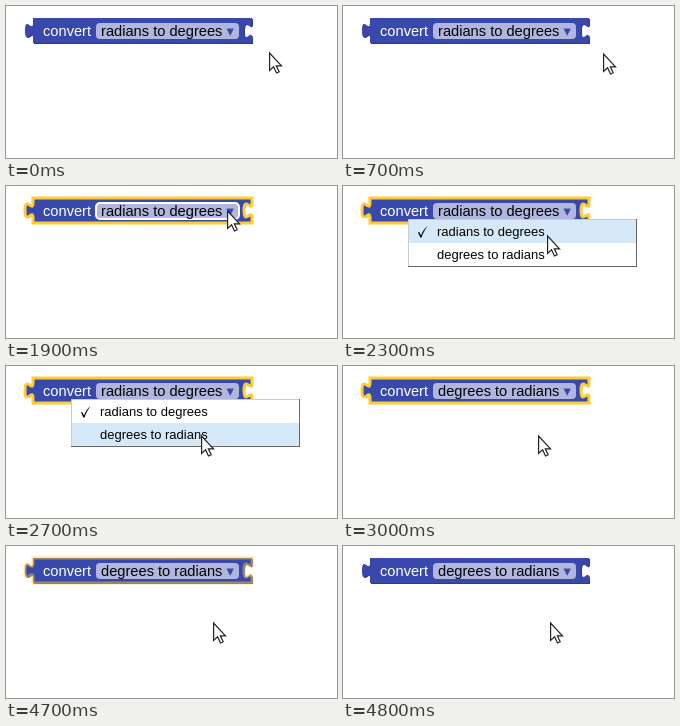
Recreate the animation shown at these times as an HTML page. Size 331 by 152 pixels, loop 5700 ms.

```html
<!DOCTYPE html>
<html lang="en">
<head>
<meta charset="utf-8">
<title>Angle conversion block</title>
<style>
  html, body { margin: 0; width: 100%; height: 100%; overflow: hidden; background: #fff; }
  svg { display: block; width: 100%; height: 100%; }
  text { font-family: "Liberation Sans", Arial, "DejaVu Sans", sans-serif; white-space: pre; }
  .block text { font-size: 11pt; }
  .menu text { font-size: 13px; }
</style>
</head>
<body>
<svg viewBox="0 0 331 152">
  <defs>
    <path id="shape" d="M27 12H246v5c0 10-8-8-8 7.500s8-2.500 8 7.500v5H27V32c0-10-8 8-8-7.500s8 2.500 8-7.500z"/>
  </defs>
  <g class="block">
    <use href="#shape" x="1" y="1" fill="#2e3a89"/>
    <use href="#shape" fill="#3949ab"/>
    <use id="selection" href="#shape" fill="none" stroke="#fc3" stroke-width="3"/>
    <text x="37" y="30" fill="#fff">convert</text>
    <rect id="field" x="90" y="17" width="143" height="16" rx="4" fill="#fff" fill-opacity=".6" stroke-width="2"/>
    <text x="95" y="30"><tspan id="value"></tspan><tspan fill="#3949ab"> ▾</tspan></text>
  </g>
  <g class="menu" id="menu">
    <rect x="65.5" y="33.5" width="228" height="47" fill="#fff" stroke="#666"/>
    <path d="M65.5 80V33.500H293" fill="none" stroke="#ccc"/>
    <rect id="highlight" x="66" width="227" height="23" fill="#d6e9f8"/>
    <path d="M75 46.500l1.200-.5 1.800 3.500C79.500 45.500 81.500 42.500 84.500 40 82 43.500 80 47 78.500 51.500h-1.200z"/>
    <text x="94" y="50">radians to degrees</text>
    <text x="94" y="73">degrees to radians</text>
  </g>
  <path id="cursor" d="M.6 1V18.500l4-3.700 2.900 6.200 2.700-1.200-2.900-6h5.200z" fill="#fff" stroke="#222" stroke-width="1.2"/>
</svg>
<script>
const LOOP = 5700, STEP = 100;
const el = id => document.getElementById(id);
const show = (id, opacity) => el(id).setAttribute("opacity", Number(opacity));

// Pointer strokes: cubic curves between two resting places
const REST = [[263, 46], [260, 47], [221, 24], [195, 69], [207, 76]];
const strokes = [
  { start: 500, end: 700 },
  { start: 900, end: 1500, bend: [[240, 75], [189, 32]] },
  { start: 1900, end: 2500, bend: [[207, 41], [207, 41]] },
  { start: 3000, end: 3400 }
];

function pointerAt(t) {
  const next = strokes.findIndex(s => t < s.end);
  if (next < 0) return REST[strokes.length];
  const { start, end, bend } = strokes[next];
  const from = REST[next], to = REST[next + 1];
  const p = Math.max(0, (t - start) / (end - start)), q = 1 - p;
  return from.map((a, i) => Math.round(bend
    ? q ** 3 * a + 3 * q * q * p * bend[0][i] + 3 * q * p * p * bend[1][i] + p ** 3 * to[i]
    : q * a + p * to[i]));
}

function render(t) {
  const [x, y] = pointerAt(t);
  const hovered = x >= 90 && x < 233 && y >= 17 && y < 33;

  el("cursor").setAttribute("transform", `translate(${x} ${y})`);
  show("selection", t < 1900 || t >= 4800 ? 0 : t < 4700 ? 1 : 0.5);
  el("field").setAttribute("stroke", hovered ? "#fff" : "none");
  el("value").textContent = t < 3000 ? "radians to degrees" : "degrees to radians";
  show("menu", t >= 2000 && t < 3000);
  show("highlight", y >= 34);
  el("highlight").setAttribute("y", y < 57 ? 34 : 57);
}

function tick() {
  render(Math.floor(performance.now() % LOOP / STEP) * STEP);
  requestAnimationFrame(tick);
}
tick();
</script>
</body>
</html>
```
